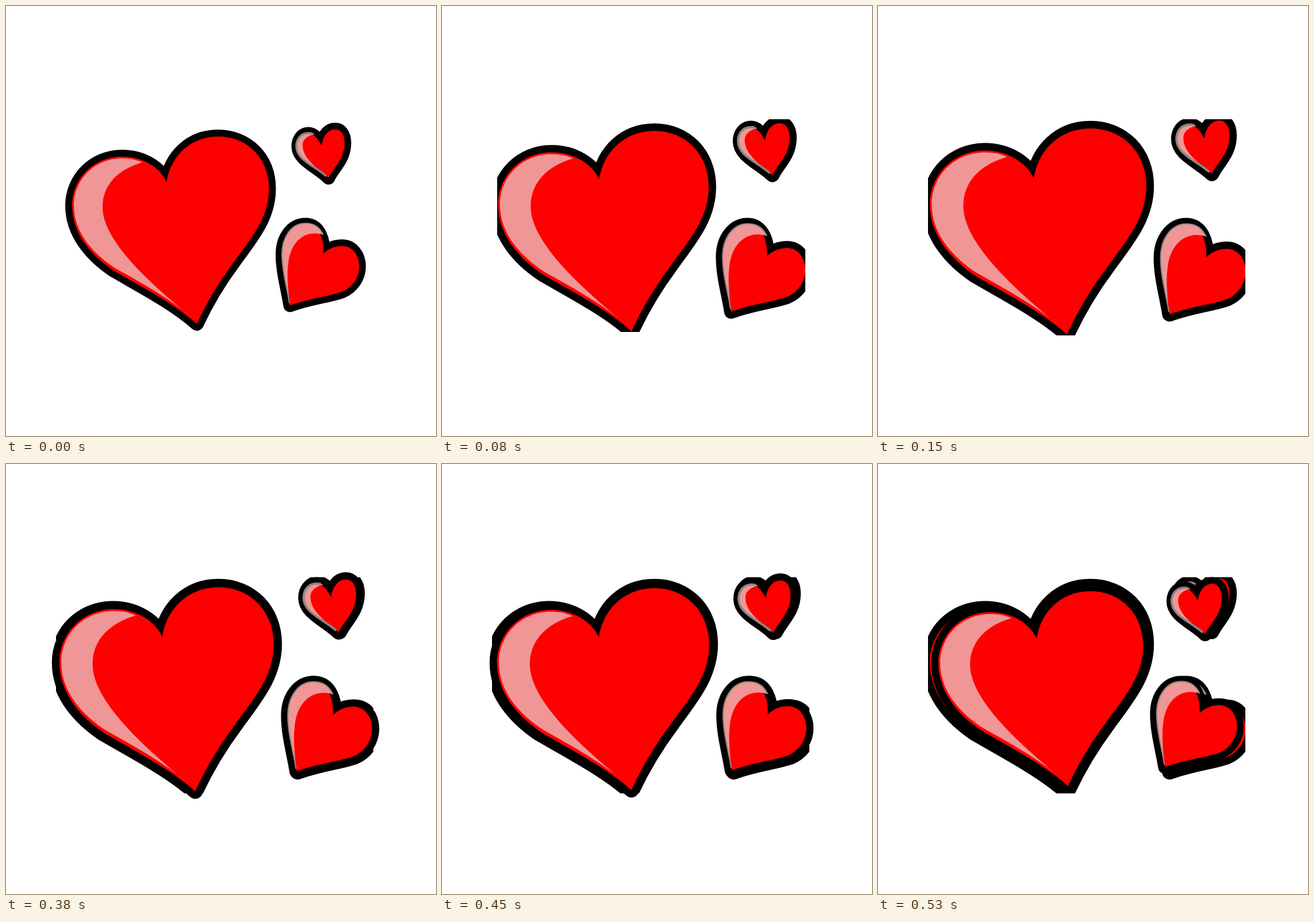
An HTML page with a canvas for the animation above (610 ms loop, 748 px wide and 748 px high).

```html
<!DOCTYPE html>
<html lang="en">
<head>
<meta charset="utf-8">
<title>Beating hearts</title>
<style>
  html, body { margin: 0; width: 100%; height: 100%; overflow: hidden; background: #fff; }
  canvas { display: block; }
</style>
</head>
<body>
<canvas id="stage" width="748" height="748"></canvas>
<script>
const ctx = document.getElementById('stage').getContext('2d');
const LOOP = 610, CX = 364, CY = 368;
const RED = '#ff0000', PINK = '#f09696', GREY = '#8c8684';

const hearts = [
  {
    line: 24, rim: 0,
    body: new Path2D('M279.5 306C268 281 238 262 202 262C152 262 115 301 115 347C115 397 150 435 187 460C235 488 295 519 332 553C352 510 372 478 396 446C425 405 457.5 370 457.5 318C457.5 265 420 227 369 227C320 227 286 262 279.5 306Z'),
    shine: new Path2D('M237 272C224 266 213 265 202 265C153 265 118 303 118 347C118 395 153 432 190 456C231 479 284 508 318 538C271 498 168 415 168 350C168 310 196 284 237 272Z')
  },
  {
    line: 23, rim: 2,
    body: new Path2D('M552 431C554 408 545 380 521 380C497 380 480.5 403 480.5 432C480.5 462 489 490 494 521C530 508 558 506 585 497C603 489 614.5 472 614.5 453C614.5 433 602 417.5 585 417.5C571 417.5 560 423 552 431Z'),
    shine: new Path2D('M552 398C546 386 538 378 521 378C496 378 480 402 480 432C480 462 489 490 493 517C491 490 488 470 491 448C495 408 522 388 552 398Z'),
    edge: new Path2D('M552 398C546 386 538 378 521 378C496 378 480 402 480 432C480 462 489 490 493 517')
  },
  {
    line: 23, rim: 3.5,
    body: new Path2D('M549 243C544 233 537 222 526 222C515 222 508 232 508 244C508 268 542 280 561 299C570 280 589 267 589 238C589 223 582 214.5 573 214.5C559 214.5 551 228 549 243Z'),
    shine: new Path2D('M537 223C533 221 530 221 526 221C513 221 505 231 505 244C505 268 537 278 557 296C541 281 516 266 516 242C516 232 525 225 537 223Z'),
    edge: new Path2D('M533 222C530 221 528 221 526 221C513 221 505 231 505 244C505 268 537 278 557 296')
  }
];

// Largest beat; it stays visible beneath the shrinking ones.
const peak = { at: 150, scale: 1.1, box: [87, 197, 639, 573] };
const beats = [
  { at: 0, scale: 1 },
  { at: 80, scale: 1.07, box: [96, 197, 632, 567] },
  peak,
  { at: 380, scale: 1.089, under: peak },
  { at: 450, scale: 1.0775, under: peak },
  { at: 530, scale: 1.04, under: peak }
];

function drawHeart({ line, rim, body, shine, edge }) {
  ctx.lineWidth = line;
  ctx.strokeStyle = '#000';
  ctx.stroke(body);
  ctx.fillStyle = RED;
  ctx.fill(body);
  ctx.fillStyle = PINK;
  ctx.fill(shine);
  if (rim) {
    ctx.lineWidth = rim;
    ctx.strokeStyle = GREY;
    ctx.stroke(edge);
  }
}

function drawBeat({ scale, box, under }) {
  if (under) drawBeat(under);
  ctx.save();
  if (box) {
    const [l, t, r, b] = box;
    ctx.beginPath();
    ctx.rect(l, t, r - l, b - t);
    ctx.clip();
  }
  ctx.translate(CX, CY);
  ctx.scale(scale, scale);
  ctx.translate(-CX, -CY);
  ctx.lineJoin = 'round';
  hearts.forEach(drawHeart);
  ctx.restore();
}

const start = performance.now();

function render() {
  const t = Math.max(0, performance.now() - start) % LOOP;
  ctx.fillStyle = '#fff';
  ctx.fillRect(0, 0, 748, 748);
  drawBeat(beats.filter(b => b.at <= t).pop());
  requestAnimationFrame(render);
}
render();
</script>
</body>
</html>
```
